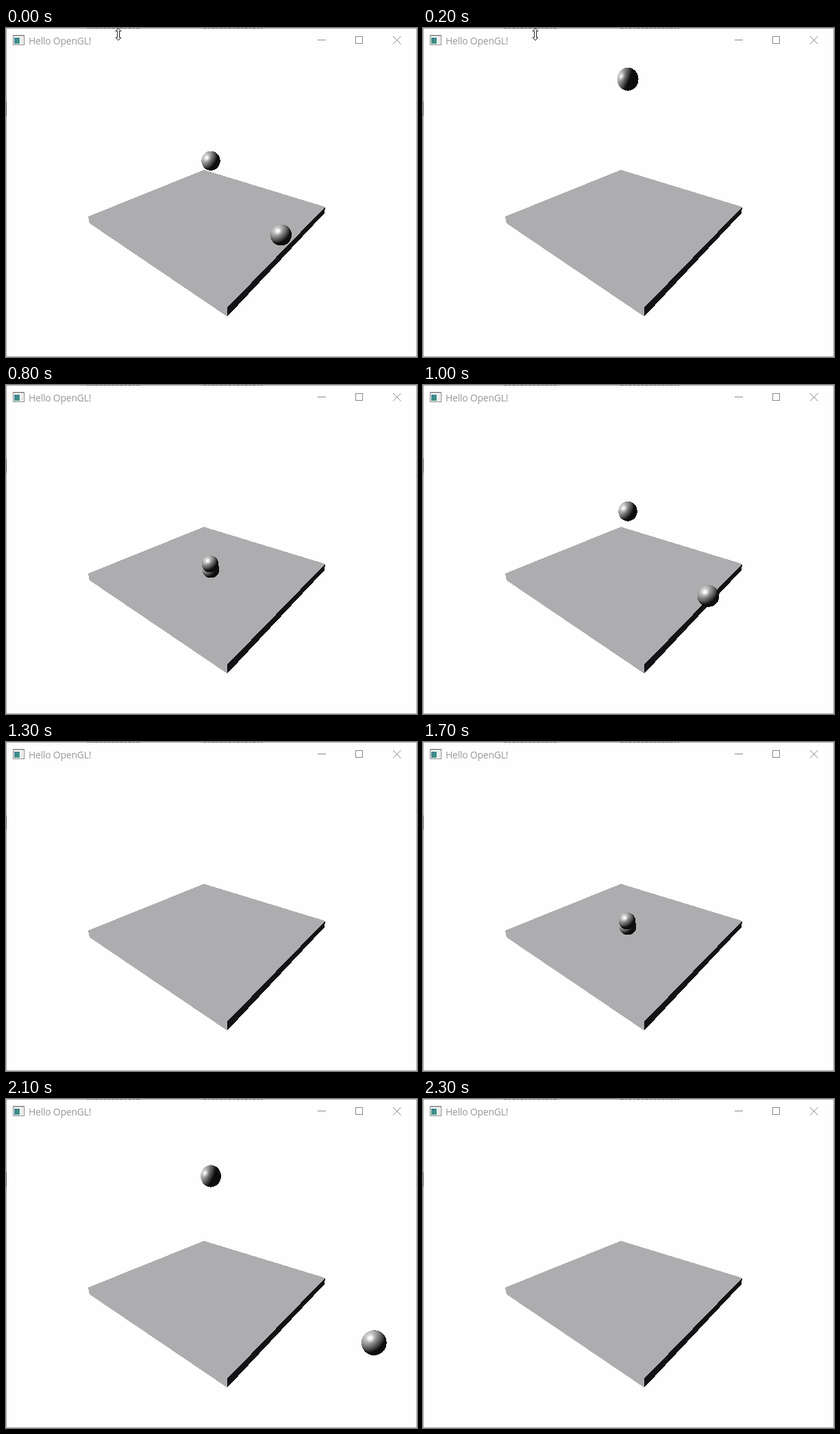
Recreate the animation shown at these times as an HTML page with a canvas. Size 600x480 px, loop 2500 ms.

```html
<!DOCTYPE html>
<html lang="en">
<head>
<meta charset="utf-8">
<title>Hello OpenGL!</title>
<style>
  html, body { margin: 0; width: 100%; height: 100%; overflow: hidden; background: #fefefe; }
  svg, canvas { position: absolute; left: 0; top: 0; width: 600px; height: 480px; }
  text { font: 14px "Open Sans", "Noto Sans", sans-serif; letter-spacing: -.25px; fill: #999; }
</style>
</head>
<body>
<svg viewBox="0 0 600 480">
  <rect x=".5" y=".5" width="599" height="479" fill="#fefefe" stroke="#a3a3a3"/>
  <!-- slivers of the windows behind -->
  <path d="M118 .5H196M288 .5H374" stroke="#666" stroke-dasharray="5 2 3 2"/>
  <path d="M.5 107V128" stroke="#666"/>

  <g shape-rendering="crispEdges">
    <rect x="10" y="11" width="16" height="13" fill="#fff" stroke="#858585"/>
    <rect x="10" y="10" width="17" height="2" fill="#999"/>
    <rect x="12" y="14" width="8" height="9" fill="url(#teal)"/>
    <path d="M22 14.5h3M22 17.5h3M22 20.5h3" stroke="#c8c8c8"/>
    <path d="M455 17.5H467" stroke="#888"/>
    <rect x="510.5" y="12.5" width="10" height="10" fill="none" stroke="#888"/>
  </g>
  <path d="M565 12L576.5 23.5M576.5 12L565 23.5" stroke="#888"/>
  <text x="33" y="24">Hello OpenGL!</text>

  <g shape-rendering="crispEdges">
    <path d="M289 207L466 261L323 421L122 285L120 275Z" fill="#adacae"/>
    <path d="M466 261L465 270L323 421V408Z" fill="#141215"/>
  </g>
  <defs>
    <linearGradient id="teal" x2="1" y2="1">
      <stop stop-color="#3f7f9a"/><stop offset="1" stop-color="#3f9a7c"/>
    </linearGradient>
  </defs>
</svg>
<canvas id="balls" width="600" height="480"></canvas>
<svg viewBox="0 0 600 480">
  <path id="resize" d="M164 .5l4 4h-2.5v9.500h2.500l-4 4-4-4h2.500v-9.500h-2.500z" fill="#fff" stroke="#222"/>
  <path id="arrow" d="M0 0V16L3.700 12.500L6.300 18L8.800 17L6.300 11.500H11Z" fill="#fff" stroke="#222"/>
</svg>
<script>
const LOOP = 2500, STEP = 100, TITLE_BOTTOM = 35;
const ctx = document.getElementById('balls').getContext('2d');
const resize = document.getElementById('resize');
const arrow = document.getElementById('arrow');

// launch time of each pair of balls and when the pair is gone
const launches = [[-158, 300], [824, 1300], [1800, 2300]];
// time, x, y of the arrow tip
const arrowPath = [[300, 130, 90], [400, 60, 270], [500, 12, 410], [600, 44, 454.5], [700, 26, 466]];

const mix = (a, b, k) => a + (b - a) * Math.min(1, Math.max(0, k));

function unit(v) {
  const n = Math.hypot(...v);
  return v.map(c => c / n);
}

// Shaded sphere with hard edges; light is a vector with y up and z to the viewer.
function drawBall(cx, cy, rx, ry, light) {
  const L = unit(light), H = unit([L[0], L[1], L[2] + 1]);
  const dot = (v, x, y, z) => Math.max(0, v[0] * x + v[1] * y + v[2] * z);
  for (let py = Math.max(TITLE_BOTTOM, Math.floor(cy - ry)); py < cy + ry; py++) {
    for (let px = Math.floor(cx - rx); px < cx + rx; px++) {
      const x = (px + .5 - cx) / rx, y = (cy - py - .5) / ry, d = x * x + y * y;
      if (d > 1) continue;
      const z = Math.sqrt(1 - d);
      const tone = .05 + .74 * dot(L, x, y, z) + .32 * dot(H, x, y, z) ** 24;
      const c = Math.min(250, Math.round(255 * tone));
      ctx.fillStyle = `rgb(${c},${c},${c})`;
      ctx.fillRect(px, py, 1, 1);
    }
  }
}

// ball flying straight up
function drawRiser(s) {
  const near = 1 - .00056 * s, r = 12.4 / near, k = (s - 90) / 270;
  const light = [mix(-.62, -.87, k), mix(.55, .36, k), mix(.6, .16, k)];
  drawBall(299, 269 - .434 * s / near, r, r * (1 + .00025 * s), light);
}

// ball flying to the right, off the plate
function drawRoller(s) {
  if (s > 330) return;
  const x = Math.max(298, 288 + .624 * s / (1 - .00083 * s));
  const r = 12.3 + .02 * s;
  drawBall(x, 284 + .395 * (x - 356), r, r, [-.5, .62, .6]);
}

function draw(t) {
  ctx.clearRect(0, 0, 600, 480);
  for (const [start, end] of launches) {
    if (t < start - 100 || t >= end) continue;
    const s = Math.max(0, t - start);
    drawRiser(s);
    drawRoller(s);
  }
  const tip = arrowPath.find(p => p[0] === t);
  resize.style.display = t < 300 ? '' : 'none';
  arrow.style.display = tip ? '' : 'none';
  if (tip) arrow.setAttribute('transform', `translate(${tip[1]} ${tip[2]})`);
}

let shown = -1;
const begin = performance.now();
function tick() {
  const t = Math.floor((performance.now() - begin) % LOOP / STEP) * STEP;
  if (t !== shown) draw(shown = t);
  requestAnimationFrame(tick);
}
tick();
</script>
</body>
</html>
```
